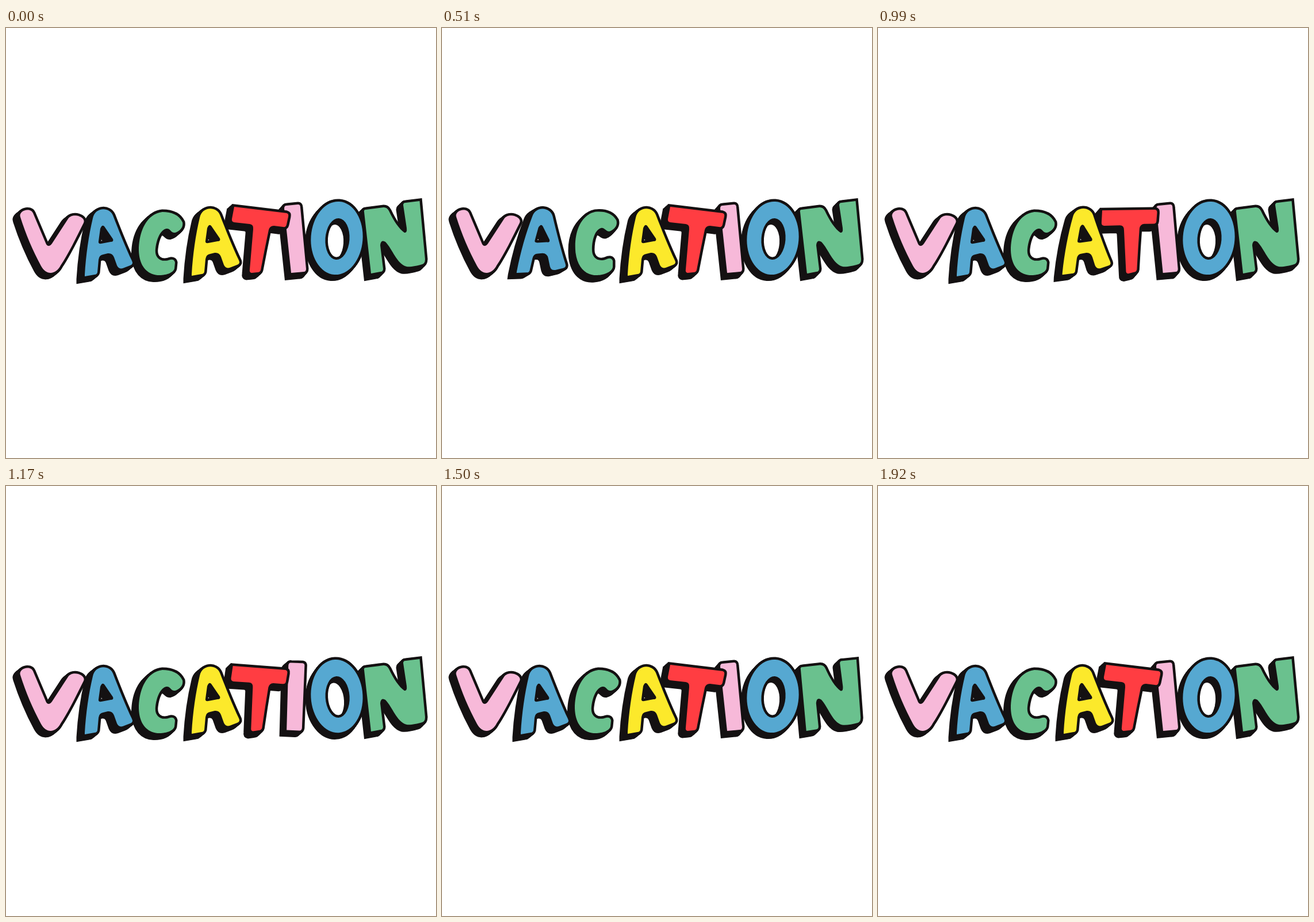
These frames come from a looping animation (748x748 px, 2010 ms). An HTML page:

```html
<!DOCTYPE html>
<html lang="en">
<head>
<meta charset="utf-8">
<title>Vacation</title>
<style>
  html, body { margin: 0; width: 100%; height: 100%; overflow: hidden; background: #fff; }
  svg { display: block; width: 100vw; height: 100vh; }
</style>
</head>
<body>
<svg id="stage" viewBox="0 0 748 748" role="img" aria-label="VACATION"></svg>
<script>
const INK = '#141112', PINK = '#f7b9d9', BLUE = '#56a8d1', GREEN = '#6ac18e',
      YELLOW = '#fce92b', RED = '#ff3d42';
const LOOP = 2010, STEP = 30, SWING = 480, ANGLE = 8;

const shapeA = `M137 429C139 395 144 360 151 331C155 311 180 311 186 326C196 352 209 384 219 405
  Q222 411 216 413L203 418Q196 420 193 413L188 399Q185 391 177 392L169 394Q162 395 161 403
  L159 425Q158 429 154 429L137 432Z
  M164 349Q168 339 173 348L186 367Q188 372 182 372L166 375Q160 376 161 371Z`;

// dir: swing direction, start: ms, pivot: centre of rotation, depth: shadow offset
const letters = [
  { fill: PINK, dir: -1, start: 0, pivot: [77, 384], depth: [-8.5, 7],
    d: `M25 329C21 318 42 311 47 322L69 374C71 380 76 381 80 375L108 332C116 320 140 329 135 339
      C122 365 108 394 95 413C87 429 70 431 61 414C46 386 35 360 25 329Z` },
  { fill: BLUE, dir: 1, start: 240, pivot: [178, 375], depth: [-10, 8], d: shapeA },
  { fill: GREEN, dir: -1, start: 360, pivot: [268, 375], depth: [-8.5, 7.5],
    d: `M307 338C301 325 288 320 272 320C246 323 231 352 231 387C232 416 247 430 267 430
      C280 430 292 425 293 418L294 408Q293 402 286 403C269 409 258 400 260 384
      C262 366 269 351 279 349C286 348 287 357 294 356C301 354 309 348 307 338Z` },
  { fill: YELLOW, dir: 1, start: 600, pivot: [178, 375], depth: [-10, 8], shift: [186, -1], d: shapeA },
  { fill: RED, dir: -1, start: 780, pivot: [440, 366], depth: [-9, 8],
    d: `M397 311L488 322Q492 323 491 328L488 342Q487 347 482 346L466 344Q459 344 457 351
      L450 385L443 421Q442 425 437 425L427 426Q423 425 424 420L430 350Q431 342 424 341
      L397 338Q392 337 393 332Z` },
  { fill: PINK, dir: 1, start: 960, pivot: [503, 367], depth: [-7, 8],
    d: `M488 309L508 307Q512 307 512 312L522 419Q522 424 518 424L496 426L484 314
      Q484 309 488 309Z` },
  { fill: BLUE, dir: -1, start: 980, pivot: [576, 366], depth: [-6, 6.5],
    d: `M580 302A45 63.6 4 0 1 571 429A45 63.6 4 0 1 580 302Z
      M579 331A21 36 4 0 0 574 403A21 36 4 0 0 579 331Z` },
  { fill: GREEN, dir: 1, start: 1440, pivot: [678, 365], depth: [-8, 8],
    d: `M626 316L657 312Q663 312 666 318C674 335 684 350 693 356Q698 357 697 348L691 308
      Q691 304 695 304L719.5 301L729 402Q729 410 724 411C714 414 703 416 697 415
      C680 411 672 384 660 372Q652 367 651 378L656 419Q656 424 651 424L635 427L623 320
      Q622 316 626 316Z` }
];

const stage = document.getElementById('stage');
const add = (parent, tag, attrs) => {
  const el = document.createElementNS('http://www.w3.org/2000/svg', tag);
  for (const key in attrs) el.setAttribute(key, attrs[key]);
  return parent.appendChild(el);
};

// Earlier letters lie on top of later ones.
for (const letter of [...letters].reverse()) {
  const { d, fill, depth: [dx, dy], shift = [0, 0] } = letter;
  const outer = add(stage, 'g', { transform: `translate(${shift})` });
  letter.group = add(outer, 'g', {});
  const ink = add(letter.group, 'g', { fill: INK, stroke: INK, 'stroke-width': 9 });
  for (let i = 0; i <= 10; i++)
    add(ink, 'path', { d, 'fill-rule': 'evenodd', transform: `translate(${dx * i / 10} ${dy * i / 10})` });
  add(letter.group, 'path', { d, fill, 'fill-rule': 'evenodd' });
}

function draw(now) {
  const t = Math.floor(now % LOOP / STEP) * STEP;
  for (const { group, dir, start, pivot } of letters) {
    const p = Math.min(1, Math.max(0, (t - start) / SWING));
    const angle = dir * ANGLE * Math.sin(Math.PI * p) ** 2;
    group.setAttribute('transform', `rotate(${angle} ${pivot.join(' ')})`);
  }
}

let begin;
function tick(now) {
  begin ??= now;
  draw(now - begin);
  requestAnimationFrame(tick);
}
draw(0);
requestAnimationFrame(tick);
</script>
</body>
</html>
```
